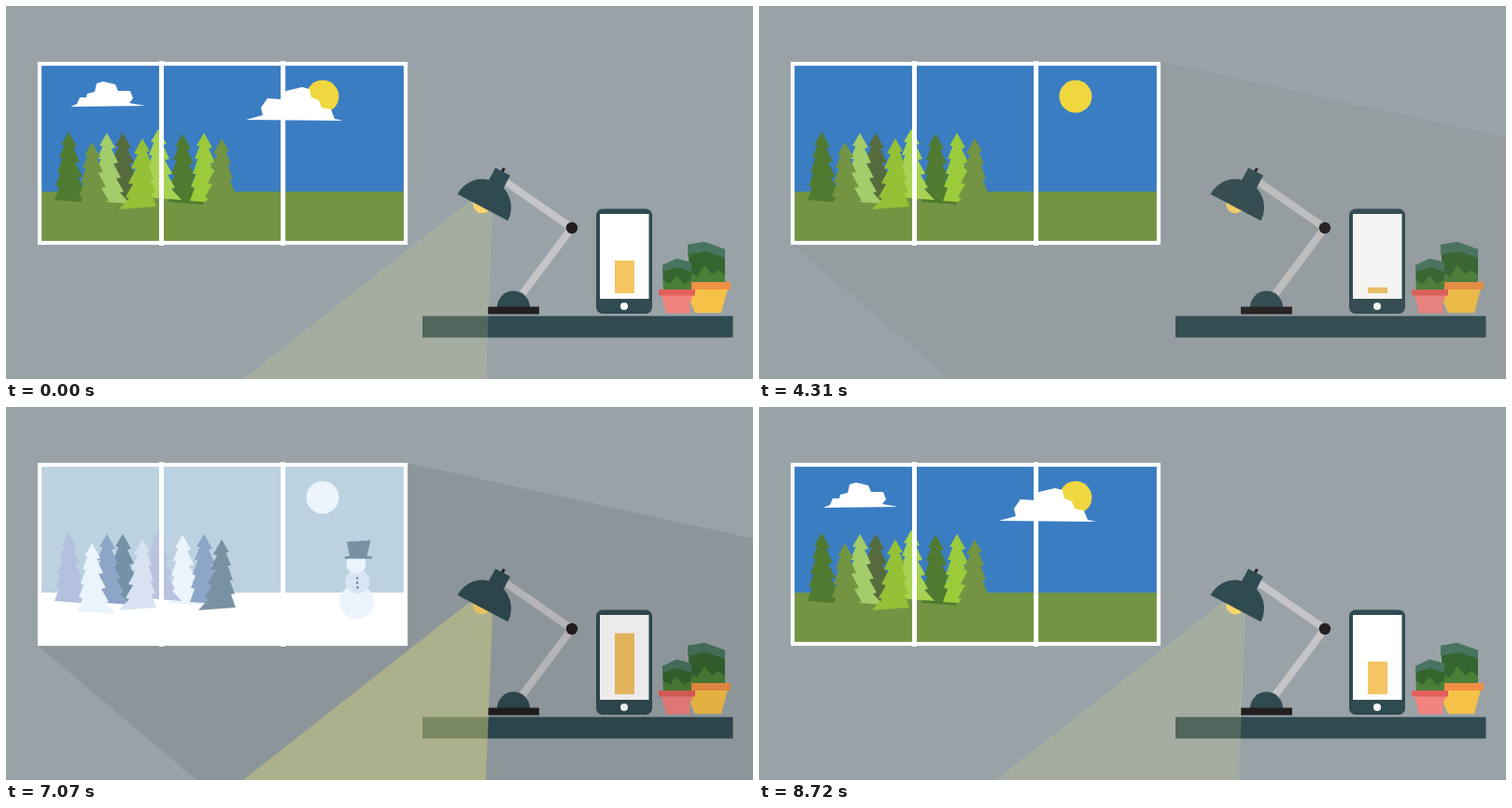
An HTML page that plays this animation: 800 px wide and 400 px high, repeating every 8750 ms.

```html
<!DOCTYPE html>
<html lang="en">
<head>
<meta charset="utf-8">
<title>Desk lamp and window</title>
<style>
  html, body { margin: 0; width: 100%; height: 100%; overflow: hidden; background: #98a2a7; }
  svg { display: block; width: 100%; height: 100%; }

  .anim { animation: 8750ms linear infinite; }
  #sunlight { opacity: 0; animation-name: sunlight; }
  #shade { opacity: 0; animation-name: shade; }
  #winter { opacity: 0; animation-name: winter; }
  #beam { opacity: .19; animation-name: beam; }
  #bar { transform-origin: 662px 308px; animation-name: bar; }
  #snowman { transform-origin: 376px 228px; animation-name: snowman; }
  .cloud { animation-name: cloud; }
  .dot { opacity: 0; animation-name: dot; }
  .dot:nth-child(2) { animation-delay: 155ms; }
  .dot:nth-child(3) { animation-delay: 310ms; }

  @keyframes sunlight {
    0%, 9.14% { opacity: 0; }
    16.69%, 44.8% { opacity: 1; }
    52.8%, 100% { opacity: 0; }
  }
  @keyframes shade {
    0%, 44.8% { opacity: 0; }
    52.8%, 83.54% { opacity: 1; }
    91.54%, 100% { opacity: 0; }
  }
  @keyframes winter {
    0%, 49.37% { opacity: 0; }
    54.29%, 92% { opacity: 1; }
    97.03%, 100% { opacity: 0; }
  }
  @keyframes cloud {
    0% { transform: none; }
    9.14% { transform: none; animation-timing-function: ease-in; }
    16.69% { transform: translateX(var(--away)); }
    89.37% { transform: translateX(var(--away)); animation-timing-function: cubic-bezier(.25, .46, .45, .94); }
    99.66%, 100% { transform: none; }
  }
  @keyframes snowman {
    0%, 51.66% { transform: scale(0); }
    55.43% { transform: scale(1.06); animation-timing-function: ease-in-out; }
    57.83%, 83.54% { transform: scale(1); }
    84.9% { transform: scale(1.06); animation-timing-function: ease-in; }
    88.57%, 100% { transform: scale(0); }
  }
  @keyframes bar {
    0% { transform: scaleY(1); }
    28% { transform: scaleY(1); animation-timing-function: ease-in-out; }
    34.86% { transform: scaleY(.18); }
    69.14% { transform: scaleY(.18); animation-timing-function: ease-in-out; }
    76% { transform: scaleY(1.87); }
    94.51% { transform: scaleY(1.87); animation-timing-function: ease-in-out; }
    99.66%, 100% { transform: scaleY(1); }
  }
  @keyframes beam {
    0%, 29.03% { opacity: .19; }
    39.66%, 70.17% { opacity: 0; }
    80.8%, 94.51% { opacity: .49; }
    99.66%, 100% { opacity: .19; }
  }
  @keyframes dot {
    0%, 19.09% { opacity: 0; }
    21.37% { opacity: 1; }
    28.46%, 60.23% { opacity: 0; }
    62.51% { opacity: 1; }
    69.6%, 100% { opacity: 0; }
  }
</style>
</head>
<body>
<svg viewBox="0 0 800 400">
  <defs>
    <path id="tree" d="M0 0L-8 14-4.500 14-10 28-6.500 28-12 44-8.500 44-14 58-10 59-15 73 25 76 14 64 18 63 10 49 15 48 7 33 12 32 5 17 9 16Z"/>
    <path id="spread" d="M430 60L800 141V400H204L34 256V60Z"/>
    <clipPath id="panes"><rect x="36" y="62" width="392" height="192"/></clipPath>
  </defs>

  <rect width="800" height="400" fill="#98a2a7"/>

  <!-- shelf -->
  <rect x="446" y="332.500" width="332.500" height="23" fill="#304a52"/>

  <!-- plants -->
  <g>
    <path d="M730 256L748 253 770 261V297H733Z" fill="#35652f"/>
    <path d="M730 256L748 253 770 261V270L750 263 730 267Z" fill="#487560"/>
    <path d="M733 297V286L740 290 748 278 756 288 763 283 770 289V297Z" fill="#4a7f38"/>
    <path d="M736 303H773L766 329H738L733 318Z" fill="#f6c147"/>
    <rect x="734" y="296" width="42" height="8" fill="#f09045"/>
    <path d="M703 278L718 271 734 275V305H704Z" fill="#35652f"/>
    <path d="M703 278L718 271 734 275V285L719 280 703 285Z" fill="#487560"/>
    <path d="M704 305V294L711 298 718 289 726 298 734 293V305Z" fill="#4a7f38"/>
    <path d="M702 310H736L732 318 733 329.500H707Z" fill="#f2837f"/>
    <rect x="699" y="304" width="39" height="6.500" fill="#e2605d"/>
  </g>

  <!-- phone -->
  <rect x="632" y="217.500" width="60" height="112.500" rx="7" fill="#304a52"/>
  <rect x="636" y="223" width="52.500" height="91" fill="#fff"/>
  <circle cx="662" cy="322" r="4" fill="#fff"/>
  <rect id="bar" class="anim" x="652" y="273" width="21" height="35" fill="#f5c463"/>

  <!-- lamp -->
  <path d="M549 314L606 238 530 185" fill="none" stroke="#c5c4c6" stroke-width="8"/>
  <circle cx="606" cy="238" r="6.200" fill="#231f20"/>
  <path d="M526 323A17.500 17.500 0 0 1 561 323Z" fill="#304a52"/>
  <rect x="516" y="322.500" width="55" height="8" fill="#231f20"/>
  <path id="beam" class="anim" d="M498 208L254 400H514L521 221Z" fill="#e0e088"/>
  <circle cx="510" cy="212.500" r="9.800" fill="#f9d468"/>
  <g transform="translate(510.500 216) rotate(28)" fill="#304a52">
    <rect x="-1" y="-48" width="3" height="6" fill="#231f20"/>
    <rect x="-8" y="-44" width="18" height="20"/>
    <path d="M-30.500 0A30.500 30.500 0 0 1 30.500 0Z"/>
  </g>

  <!-- signal -->
  <g fill="#fff">
    <circle class="dot anim" cx="582.500" cy="304" r="4.200"/>
    <circle class="dot anim" cx="600" cy="304" r="4.200"/>
    <circle class="dot anim" cx="617" cy="304" r="4.200"/>
  </g>

  <!-- daylight on the wall -->
  <g id="sunlight" class="anim"><use href="#spread" fill="#fffff0" opacity=".09"/></g>
  <g id="shade" class="anim"><use href="#spread" fill="#000" opacity=".08"/></g>

  <!-- window -->
  <g clip-path="url(#panes)">
    <rect x="36" y="62" width="392" height="138" fill="#3a7dc2"/>
    <rect x="36" y="199" width="392" height="55" fill="#739443"/>
    <circle cx="339" cy="97" r="17.500" fill="#f1d73f"/>
    <use href="#tree" x="125" y="136" fill="#566b3d"/>
    <use href="#tree" x="108" y="136" fill="#a3cc6a"/>
    <use href="#tree" x="67" y="135" fill="#4f7a30"/>
    <use href="#tree" x="92" y="146" fill="#739443"/>
    <use href="#tree" x="189" y="137" fill="#4f7a30"/>
    <use href="#tree" x="163" y="132" fill="#a8d352"/>
    <use href="#tree" transform="translate(146 142) scale(-1 1)" fill="#94c136"/>
    <use href="#tree" x="212" y="136" fill="#9bcb3b"/>
    <use href="#tree" transform="translate(231 142) scale(-1 1)" fill="#739443"/>

    <g id="winter" class="anim">
      <rect x="36" y="62" width="392" height="138" fill="#bcd2e1"/>
      <rect x="36" y="199" width="392" height="55" fill="#fff"/>
      <circle cx="339" cy="97" r="17.500" fill="#ecf4fc"/>
      <use href="#tree" x="125" y="136" fill="#7690a6"/>
      <use href="#tree" x="108" y="136" fill="#8da5c6"/>
      <use href="#tree" x="67" y="135" fill="#b3c0df"/>
      <use href="#tree" x="92" y="146" fill="#ebf4fc"/>
      <use href="#tree" x="189" y="137" fill="#ebf4fc"/>
      <use href="#tree" x="163" y="132" fill="#b9c3e0"/>
      <use href="#tree" transform="translate(146 142) scale(-1 1)" fill="#d8e2f2"/>
      <use href="#tree" x="212" y="136" fill="#8da5c6"/>
      <use href="#tree" transform="translate(231 142) scale(-1 1)" fill="#7891a3"/>
      <g id="snowman" class="anim">
        <circle cx="375.500" cy="209" r="18.500" fill="#ebf4fc"/>
        <circle cx="376.500" cy="187" r="13" fill="#d9e4f4"/>
        <circle cx="375" cy="168" r="10.500" fill="#ebf4fc"/>
        <path d="M365 144.500L390.500 143 386.500 160H392V162.500H363V160H368Z" fill="#7890a4"/>
        <g fill="#5f7285">
          <circle cx="376" cy="183.500" r="1.200"/>
          <circle cx="376" cy="188.500" r="1.200"/>
          <circle cx="376.500" cy="193.500" r="1.200"/>
        </g>
      </g>
    </g>

    <g fill="#fff">
      <path class="cloud anim" style="--away:-115px" d="M69 108L76 105 79 98 86 98 87 94 95 92 97 83 104 81 117 84 120 91 133 91 136 99 132 104 149 107Z"/>
      <path class="cloud anim" style="--away:175px" d="M257 122L275 117 273 109 280 99 294 100 300 91 317 87 325 89 327 98 335 101 338 109 348 111 352 121 361 123Z"/>
    </g>
  </g>
  <rect x="36" y="62" width="392" height="192" fill="none" stroke="#fff" stroke-width="4.200"/>
  <path d="M166.500 59V257M296.700 59V257" stroke="#fff" stroke-width="5"/>
</svg>
</body>
</html>
```
